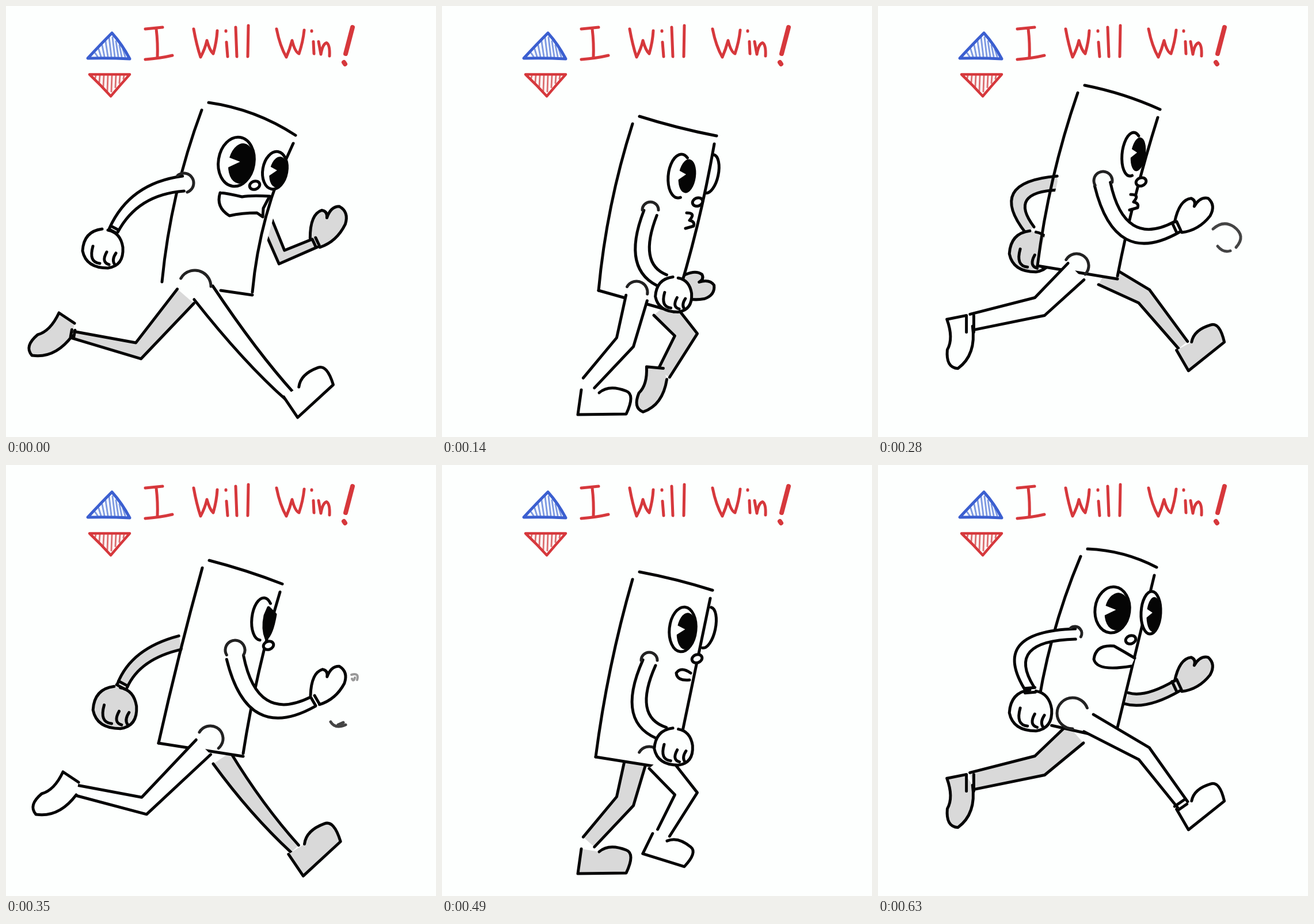
Recreate the animation shown at these times as an HTML page with a canvas. Size 747x750 px, loop 700 ms.

```html
<!DOCTYPE html>
<html lang="en">
<head>
<meta charset="utf-8">
<title>I Will Win!</title>
<style>
html, body { margin: 0; width: 100%; height: 100%; overflow: hidden; background: #fdfffe; }
canvas { display: block; }
</style>
</head>
<body>
<canvas id="stage" width="747" height="750" role="img" aria-label="I Will Win!"></canvas>
<script>
const ctx = document.getElementById('stage').getContext('2d');
const STEP = 70, INK = '#050505', PAPER = '#fdfffe', GREY = '#d9d9d9', RED = '#d6383c', BLUE = '#3b5fd0';

const MITTEN = 'M-11 0Q-37-33-25-51Q-16-56-10-46Q-17-66-5-75Q14-78 22-57Q29-24 12 2';
const FIST = 'M-2-34Q-34-30-36 4Q-30 34 8 34Q36 30 34-2Q30-28 8-32M-18-4Q-26 24-6 26M6 6Q-4 24 10 28M22 8Q14 20 20 28';
const SHOE = 'M-12-4L-18 39L66 38Q82 4 66-2Q36-14 19 1';
const PUSH_SHOE = 'M-13-13L-37 15Q-24 45 1 68L64 66Q76 30 48 18Q25 14 0 23';
const HANGING_SHOE = 'M4-16L-23-34Q-38-2-60 4Q-84 24-70 40Q-30 46 0 6';
const CUFF = 'M-4-9V9M4-9V9';

function shape(path, fill, color = INK, width = 5) {
  if (typeof path === 'string') path = new Path2D(path);
  if (fill) { ctx.fillStyle = fill; ctx.fill(path); }
  if (width) { ctx.strokeStyle = color; ctx.lineWidth = width; ctx.stroke(path); }
}

const ink = (path, color, width) => shape(path, null, color, width);

function stamp(path, x, y, deg = 0, scale = 1, fill = PAPER) {
  const placed = new Path2D();
  placed.addPath(new Path2D(path), new DOMMatrix().translate(x, y).rotate(deg).scale(scale));
  shape(placed, fill);
}

function oval(x, y, rx, ry, deg = 0, from = 0, to = 360) {
  const path = new Path2D(), rad = Math.PI / 180;
  path.ellipse(x, y, rx, ry, deg * rad, from * rad, to * rad);
  return path;
}

const arc = (x, y, r, from, to) => ink(oval(x, y, r, r, 0, from, to), '#222');

// Edge between two points, pushed sideways by bow
function edge(x0, y0, x1, y1, bow = 0) {
  const dx = x1 - x0, dy = y1 - y0, k = 2 * bow / Math.hypot(dx, dy);
  ink(`M${x0} ${y0}Q${(x0 + x1) / 2 - dy * k} ${(y0 + y1) / 2 + dx * k} ${x1} ${y1}`);
}

// Corners run clockwise from top left; bottomFrom is where the lower edge begins
function box(ax, ay, bx, by, cx, cy, dx, dy, bows, bottomFrom = 0) {
  const [top, left, right] = bows;
  shape(`M${ax} ${ay}L${bx} ${by}L${cx} ${cy}L${dx} ${dy}Z`, PAPER, INK, 0);
  edge(ax + 7, ay, bx, by, top);
  edge(ax - 5, ay + 13, dx, dy, left);
  edge(bx - 4, by + 14, cx, cy - 5, right);
  if (bottomFrom < 1) edge(dx + (cx - dx) * bottomFrom, dy + (cy - dy) * bottomFrom, cx, cy);
}

// Tapered tube from a to c; b is the joint, or the control point when round
function limb(ax, ay, bx, by, cx, cy, w0, w1, round, fill = PAPER) {
  const u = Math.atan2(by - ay, bx - ax), v = Math.atan2(cy - by, cx - bx);
  const turn = Math.atan2(Math.sin(v - u), Math.cos(v - u)) / 2;
  const joint = (w0 + w1) / 2 / Math.max(0.5, Math.cos(turn));
  const at = (x, y, a, w) => `${x - Math.sin(a) * w} ${y + Math.cos(a) * w}`;
  const side = s => [at(ax, ay, u, s * w0), at(bx, by, u + turn, s * joint), at(cx, cy, v, s * w1)];
  const l = side(1), r = side(-1), seg = round ? (p, q) => `Q${p} ${q}` : (p, q) => `L${p}L${q}`;
  shape(`M${l[0]}${seg(l[1], l[2])}L${r[2]}${seg(r[1], r[0])}Z`, fill, INK, 0);
  ink(`M${l[0]}${seg(l[1], l[2])}M${r[0]}${seg(r[1], r[2])}`);
}

// Pie-cut pupil
function pupil(x, y, rx, ry, deg) {
  shape(oval(x, y, rx, ry, deg), INK, INK, 0);
  shape(`M${x - 2} ${y - 3}L${x - rx - 3} ${y - 12}V${y + 8}Z`, PAPER, INK, 0);
}

function eye(x, y, rx, ry, deg) {
  shape(oval(x, y, rx, ry, deg), PAPER);
  pupil(x + rx * 0.28, y + 3, rx * 0.72, ry * 0.82, deg);
}

function sideEye(x, y, rx, ry) {
  ink(oval(x, y, rx, ry, 6, 75, 300));
  pupil(x + rx * 0.65, y, rx * 0.75, ry * 0.78, 8);
}

// Far eye peeking out behind the edge of the face
function edgeEye(x, y, rx, ry, deg, fill) {
  shape(oval(x, y, rx, ry, deg, -90, 90), fill);
}

const nose = (x, y) => shape(oval(x, y, 9, 7, -20), PAPER);
const mouth = path => shape(path, PAPER);
const lips = (x, y) => stamp('M-6-10Q8-10 2-1L-1 3Q9 5 6 13L-8 17', x, y);

function stretchNear() {
  limb(312, 505, 230, 600, 116, 572, 19, 6, false, GREY);
  stamp(HANGING_SHOE, 115, 568, 0, 1, GREY);
  stamp(CUFF, 116, 570, 10, 0.7, GREY);
  limb(449, 366, 479, 437, 538, 412, 10, 8, false, GREY);
  stamp(MITTEN, 537, 411, 38, 1, GREY);
  stamp(CUFF, 538, 411, -25, 0.8, GREY);
  box(345, 168, 503, 225, 428, 503, 271, 480, [-9, 10, 12], 0.65);
  eye(400, 271, 31, 43, 9);
  eye(467, 286, 21, 33, 10);
  nose(432, 312);
  mouth('M372 325Q385 326 410 332Q425 329 458 331L447 352L446 367L436 360Q410 360 388 365Q364 350 372 325');
  limb(308, 309, 222, 318, 187, 390, 13, 8, true);
  arc(309, 308, 17, -130, 70);
  stamp(FIST, 169, 422);
  stamp(CUFF, 187, 389, 118, 0.8);
  limb(343, 499, 425, 612, 494, 680, 20, 9, true);
  arc(328, 488, 28, -150, 0);
  stamp(SHOE, 494, 675, -42);
}

function stepNear() {
  limb(320, 556, 341, 618, 224, 644, 18, 11, false, GREY);
  stamp(HANGING_SHOE, 226, 640, -15, 1, GREY);
  limb(428, 405, 446, 488, 516, 514, 10, 12, false, GREY);
  stamp(MITTEN, 518, 514, 40, 1.05, GREY);
  stamp(CUFF, 519, 514, 15, 1, GREY);
  edgeEye(460, 324, 17, 37, 12, INK);
  ink('M457 318L467 317', PAPER);
  box(327, 218, 466, 240, 392, 553, 262, 490, [4, 0, 0], 0.87);
  eye(395, 315, 25, 40, 6);
  nose(428, 359);
  mouth('M431 381Q400 372 380 374Q370 378 375 385Q404 380 430 393');
  limb(318, 508, 390, 586, 313, 670, 17, 12);
  stamp(SHOE, 314, 672);
  limb(334, 368, 195, 433, 275, 486, 11, 12, true);
  arc(335, 365, 12, -130, 60);
  stamp(FIST, 291, 518, 0, 1.13);
}

function passNear() {
  limb(383, 525, 424, 572, 385, 640, 20, 12, false, GREY);
  stamp(HANGING_SHOE, 388, 645, -28, 0.9, GREY);
  stamp(MITTEN, 405, 488, 92, 0.9, GREY);
  edgeEye(465, 292, 15, 34, 12);
  box(336, 192, 477, 226, 403, 532, 272, 495, [2, 8, -5]);
  sideEye(413, 296, 20, 38);
  nose(444, 341);
  lips(431, 370);
  limb(338, 508, 318, 585, 255, 656, 19, 13);
  arc(338, 498, 19, -150, 10);
  stamp(SHOE, 254, 672);
  limb(362, 360, 325, 455, 386, 479, 12, 12, true);
  arc(362, 355, 14, 180, 360);
  stamp(FIST, 403, 502, 0, 0.9);
}

function pushNear() {
  limb(330, 330, 243, 362, 298, 402, 11, 11, true, GREY);
  limb(410, 490, 455, 518, 448, 640, 16, 8, false, GREY);
  stamp(SHOE, 448, 642, 7, 0.9, GREY);
  edgeEye(460, 280, 13, 25, 15);
  box(346, 170, 487, 213, 403, 510, 277, 457, [2, -20, 9]);
  ink('M400 243Q425 250 457 246');
  sideEye(422, 278, 18, 32);
  ink('M446 317Q460 318 456 327L446 330');
  lips(437, 351);
  limb(333, 460, 243, 542, 154, 624, 16, 9);
  arc(336, 453, 18, -75, 60);
  stamp(PUSH_SHOE, 152, 640);
  stamp(CUFF, 152, 633, 145, 1.1, null);
  limb(377, 350, 374, 443, 453, 453, 9, 8, true);
  arc(376, 342, 15, 190, 350);
  stamp(MITTEN, 456, 455, 103, 0.95);
  stamp(CUFF, 451, 453, 5, 0.9);
  ink('M482 382Q490 390 506 386Q514 382 518 388M520 385Q548 378 564 398M560 402Q575 415 560 432Q535 446 516 422M512 405Q496 400 496 411Q502 423 514 418');
}

function leapNear() {
  limb(312, 308, 206, 315, 264, 390, 12, 9, true, GREY);
  stamp(FIST, 266, 427, 0, 1.05, GREY);
  limb(392, 468, 462, 505, 530, 590, 19, 10, false, GREY);
  stamp(SHOE, 530, 595, -38, 0.95, GREY);
  box(352, 138, 490, 180, 416, 475, 277, 452, [-4, 8, 4]);
  sideEye(441, 258, 17, 38);
  nose(457, 306);
  lips(445, 338);
  limb(344, 462, 281, 523, 163, 550, 20, 14);
  arc(345, 452, 21, -150, 45);
  stamp(HANGING_SHOE, 160, 553, -45);
  stamp(CUFF, 160, 553, 0, 1.6);
  limb(390, 310, 420, 440, 520, 384, 14, 10, true);
  arc(391, 304, 16, 150, 370);
  stamp(MITTEN, 522, 384, 50, 0.95);
  stamp(CUFF, 519, 385, -25);
  ink('M582 388Q600 372 618 384Q640 400 622 420M612 426Q600 430 590 418', '#444');
}

function stretchFar() {
  limb(303, 309, 225, 328, 202, 384, 12, 9, true, GREY);
  stamp(FIST, 190, 422, 0, 1.08, GREY);
  stamp(CUFF, 201, 383, 118, 0.9, GREY);
  limb(375, 510, 435, 600, 502, 668, 18, 9, true, GREY);
  stamp(SHOE, 503, 672, -42, 1.05, GREY);
  box(346, 166, 480, 207, 412, 507, 265, 484, [-2, 2, 5]);
  ink(oval(445, 268, 18, 37, 6, 90, 310));
  shape('M456 248L468 260Q462 295 452 302Q445 285 450 262Z', INK);
  nose(456, 314);
  limb(343, 491, 240, 593, 122, 566, 18, 9);
  arc(355, 476, 22, -150, 50);
  stamp(HANGING_SHOE, 122, 568);
  limb(398, 335, 428, 468, 533, 412, 15, 9, true);
  arc(398, 322, 17, 150, 390);
  stamp(MITTEN, 537, 408, 40, 0.95);
  stamp(CUFF, 537, 410, -30, 0.9);
  ink('M564 447Q572 460 590 452M577 452L586 448', '#444');
  ink('M600 365Q614 361 610 374M601 372Q604 378 606 370', '#999', 4);
}

function stepFar() {
  limb(278, 372, 207, 415, 255, 462, 12, 12, true, GREY);
  stamp(FIST, 257, 490, 0, 0.85, GREY);
  limb(362, 550, 384, 598, 322, 664, 14, 15, false, GREY);
  stamp(SHOE, 318, 668, 0, 1, GREY);
  stamp(CUFF, 318, 668, 75, 1.3, null);
  box(329, 213, 469, 241, 402, 551, 258, 526, [-2, 8, 0]);
  arc(433, 275, 14, 200, 340);
  sideEye(423, 312, 21, 38);
  nose(444, 361);
  ink('M430 380Q415 385 416 393L423 395', '#333');
  limb(320, 508, 339, 624, 234, 640, 21, 9);
  arc(325, 500, 20, -130, 0);
  stamp(HANGING_SHOE, 228, 640, -15);
  stamp(CUFF, 227, 644, 15, 1.8, null);
  limb(362, 368, 378, 495, 500, 505, 13, 11, true);
  arc(361, 366, 15, 190, 350);
  stamp(MITTEN, 506, 504, 42);
  stamp(CUFF, 501, 504, -30, 1.1);
}

function passFar() {
  limb(338, 508, 318, 585, 255, 656, 19, 13, false, GREY);
  stamp(SHOE, 254, 672, 0, 1, GREY);
  edgeEye(460, 283, 15, 36, 12);
  box(336, 186, 470, 218, 405, 530, 267, 508, [-2, 6, 0]);
  eye(418, 286, 23, 39, 6);
  nose(443, 337);
  mouth('M432 362Q415 350 407 362Q408 376 430 374');
  limb(375, 515, 424, 572, 385, 640, 20, 12);
  arc(360, 510, 20, -150, 0);
  stamp(SHOE, 375, 648, 18, 0.9);
  limb(360, 344, 315, 445, 386, 468, 12, 12, true);
  arc(360, 340, 14, 180, 360);
  stamp(FIST, 403, 490, 0, 0.95);
}

function pushFar() {
  limb(282, 508, 215, 572, 152, 634, 17, 9, false, GREY);
  stamp(PUSH_SHOE, 150, 640, 0, 1, GREY);
  stamp(CUFF, 149, 636, 145, 1.1, null);
  limb(415, 446, 435, 450, 456, 453, 10, 10, false, GREY);
  stamp(MITTEN, 456, 457, 97, 0.95, GREY);
  stamp(CUFF, 447, 453, 0, 1.2, GREY);
  edgeEye(460, 264, 15, 36, 8, PAPER);
  edgeEye(460, 264, 10, 30, 8, INK);
  box(343, 156, 470, 196, 407, 500, 274, 458, [-5, 7, 0], 1);
  eye(411, 259, 24, 40, 4);
  nose(440, 313);
  mouth('M435 338Q420 332 412 324Q394 326 394 343Q396 358 412 357L434 352');
  limb(355, 469, 449, 524, 447, 625, 18, 12);
  stamp(SHOE, 443, 634, 9, 0.95);
  stamp(CUFF, 443, 626, 80, 1.1);
  limb(352, 314, 231, 370, 325, 446, 13, 11, true);
  arc(350, 315, 13, -110, 50);
  stamp(FIST, 306, 481, 0, 1.13);
  ink('M303 444L336 440L305 458L340 455');
}

function leapFar() {
  limb(343, 468, 281, 523, 163, 550, 21, 15, false, GREY);
  stamp(HANGING_SHOE, 160, 553, -45, 1, GREY);
  stamp(CUFF, 160, 553, 0, 1.6, GREY);
  limb(432, 406, 465, 416, 520, 384, 10, 10, true, GREY);
  stamp(MITTEN, 522, 384, 50, 0.95, GREY);
  stamp(CUFF, 519, 384, -25, 1.1, GREY);
  box(357, 146, 484, 178, 412, 478, 274, 447, [-7, 10, 0], 0.2);
  eye(407, 252, 30, 40, 7);
  eye(474, 257, 17, 37, 3);
  nose(439, 304);
  mouth('M446 336Q428 325 410 315Q378 312 375 338Q380 360 440 350');
  limb(366, 449, 462, 502, 530, 592, 17, 10);
  arc(338, 432, 27, 90, 340);
  stamp(SHOE, 530, 595, -38, 0.95);
  stamp(CUFF, 526, 592, 55, 1.1);
  limb(343, 294, 206, 298, 264, 390, 9, 8, true);
  arc(342, 293, 12, -130, 30);
  stamp(FIST, 266, 427, 0, 1.05);
  stamp(CUFF, 264, 392, 85);
}

function drawTitle() {
  let blueHatch = '', redHatch = '';
  for (let x = 155; x < 206; x += 6) blueHatch += `M${x} ${51 + Math.abs(x - 182) * 1.15}L${x + 4} 88`;
  for (let x = 156; x < 208; x += 7) redHatch += `M${x} 121L${x - 1} ${152 - Math.abs(x - 181) * 1.05}`;
  ink(blueHatch, '#7f9be2', 3);
  ink('M184 47Q165 66 142 91Q180 90 215 92Q202 67 184 47Z', BLUE);
  ink(redHatch, '#dd7274', 3);
  ink('M145 119H215Q198 138 182 157Q165 138 145 119Z', RED, 4.5);
  ink('M242 40L272 37M261 40Q264 65 263 90M242 93Q268 91 289 86', RED);
  ink('M326 40Q331 68 338 89Q346 74 349 60Q354 78 360 83Q366 62 367 43', RED);
  ink('M383 63L385 88M382 43V44M399 37L401 88M421 34L420 88', RED);
  ink('M470 40Q476 70 487 89Q493 75 497 60Q502 80 509 83Q516 62 518 42', RED);
  ink('M534 62L535 83M531 43V44M543 62L547 84Q550 66 557 64Q563 68 562 87', RED);
  ink('M602 37L590 83M587 98L589 101', RED, 8);
}

const cycle = [stretchNear, stepNear, passNear, pushNear, leapNear, stretchFar, stepFar, passFar, pushFar, leapFar];
const start = performance.now();
ctx.lineCap = ctx.lineJoin = 'round';

function tick() {
  ctx.fillStyle = PAPER;
  ctx.fillRect(0, 0, 747, 750);
  drawTitle();
  cycle[Math.floor((performance.now() - start) / STEP) % cycle.length]();
  requestAnimationFrame(tick);
}
tick();
</script>
</body>
</html>
```
